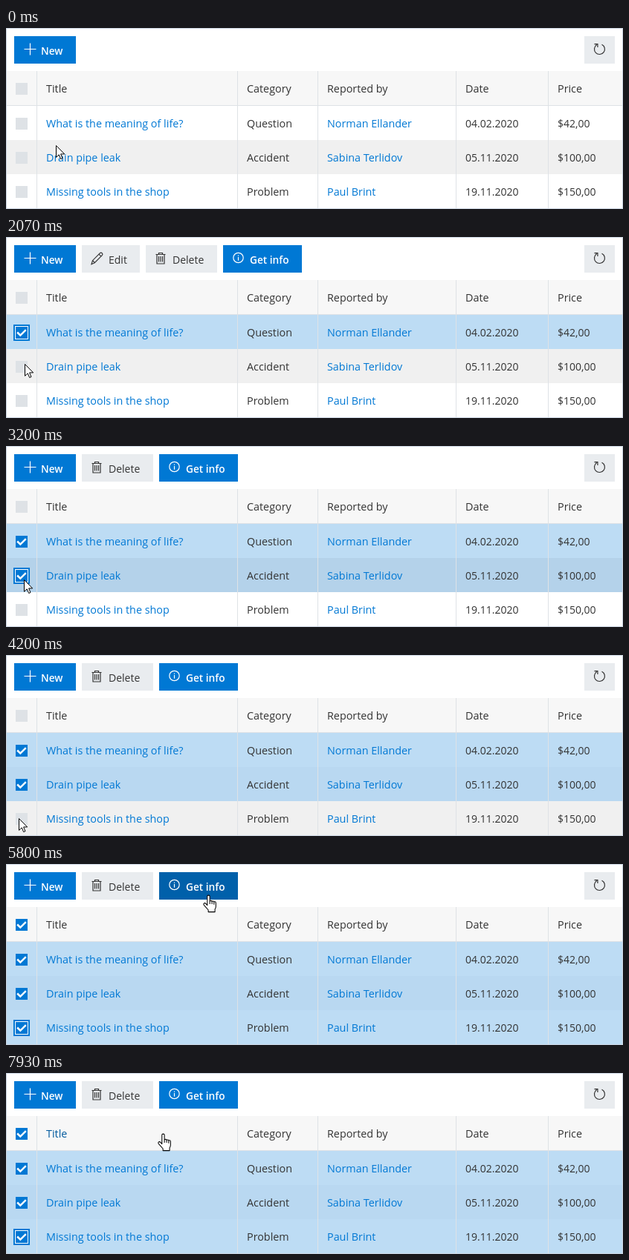
These frames come from a looping animation (830x244 px, 8 s). An HTML page:

```html
<!DOCTYPE html>
<html lang="en">
<head>
<meta charset="utf-8">
<title>Issue list</title>
<style>
  html, body { margin: 0; width: 100%; height: 100%; overflow: hidden; background: #fff; }
  svg { display: block; font: 14.35px "Open Sans", "Noto Sans", sans-serif; }
  text { white-space: pre; }
  .icon { fill: none; stroke-width: 1.2; }
</style>
</head>
<body>
<svg id="stage" width="830" height="244" viewBox="0 0 830 244"></svg>
<script>
const LOOP = 8000, FPS = 15;
const BLUE = '#0078d4', HOVER_BLUE = '#0060aa', DARK_BLUE = '#005a9e';
const GREY = '#e9ecef', LINE = '#dee2e6', INK = '#333';
const stage = document.getElementById('stage');

const columns = [54, 324, 432, 618, 742];
const dividers = [41, 311, 419, 605, 729];
const headings = ['Title', 'Category', 'Reported by', 'Date', 'Price'];
const rows = [
  { cells: ['What is the meaning of life?', 'Question', 'Norman Ellander', '04.02.2020', '$42,00'], selectAt: 15, focus: [15, 35] },
  { cells: ['Drain pipe leak', 'Accident', 'Sabina Terlidov', '05.11.2020', '$100,00'], selectAt: 37, focus: [37, 63] },
  { cells: ['Missing tools in the shop', 'Problem', 'Paul Brint', '19.11.2020', '$150,00'], selectAt: 65, focus: [65, 120] }
];

// Icons are centred near the origin.
const icons = {
  plus: 'M-7 0H9M1-8V8',
  pencil: 'M-7.5 8.2L-6 3.2L4-6.8Q5.4-8 6.8-6.6Q8.1-5.2 6.8-3.8L-3.2 6.2ZM-6 3.2L-3.2 6.2M2.5-5.3L5.4-2.4',
  trash: 'M-7-5H6M-3-5V-7H2V-5M-5.5-5V7.5H4.5V-5M-3-2.5V5M-.5-2.5V5M2-2.5V5',
  info: 'M-6.7-.5A6.7 6.7 0 1 1 6.7-.5A6.7 6.7 0 1 1-6.7-.5M0-1.5V3.3M0-4.1V-2.7',
  refresh: 'M3-6.3A7 7 0 1 1-3.8-5.9M-7-6.9H-2.6V-2.5'
};
const ARROW = 'M.5.5V16.3L4.2 12.8L6.7 18.5L9 17.5L6.6 11.9H11.7Z';
const HAND = 'M5.5 13.5V2.2a1.6 1.6 0 0 1 3.2 0V8.5q0-1 1.4-1 1.4 0 1.4 1.3 0-.7 1.3-.7 1.3 0 1.3 1.4 ' +
  '0-.8 1.1-.7 1.3.1 1.3 1.6V15q0 2-1.2 3.6V22H6.8V19.5L1.2 13.2Q.2 11.6 1.4 10.8 2.5 10.2 3.8 11.6Z' +
  'M8.7 8.5V12M11.5 9V12M14.1 9.5V12.5';

const smooth = p => p * p * (3 - 2 * p);
const easeIn = p => p ** 1.5;
const easeOut = p => 1 - (1 - p) ** 1.5;

// Pointer stops: tick, x, y, easing on the way there.
const stops = [
  [0, 67, 158], [12, 25, 128], [23, 25, 128], [31, 25, 171], [45, 25, 171],
  [56, 17, 220], [68, 17, 220], [73, 107, 204, easeIn], [81, 262, 52, easeOut],
  [87, 271, 43, easeOut], [110, 271, 43], [111, 267, 46], [113, 267, 46], [119, 210, 83]
];

function pointerAt(tick) {
  const i = Math.max(1, stops.findIndex(s => s[0] >= tick));
  const [t0, x0, y0] = stops[i - 1], [t1, x1, y1, ease = smooth] = stops[i];
  const p = ease((tick - t0) / (t1 - t0));
  return { x: Math.round(x0 + (x1 - x0) * p), y: Math.round(y0 + (y1 - y0) * p) };
}

const rect = (x, y, w, h, fill) => `<rect x="${x}" y="${y}" width="${w}" height="${h}" fill="${fill}"/>`;
const label = (x, y, str, fill, extra = '') => `<text x="${x}" y="${y}" fill="${fill}" ${extra}>${str}</text>`;
const icon = (name, x, y, color) => `<path class="icon" d="${icons[name]}" transform="translate(${x} ${y})" stroke="${color}"/>`;
const mix = (a, b, p) => '#' + [1, 3, 5].map(i => {
  const [u, v] = [a, b].map(c => parseInt(c.slice(i, i + 2), 16));
  return Math.round(u + (v - u) * p).toString(16).padStart(2, '0');
}).join('');

// "primary" runs from 0 (grey button) to 1 (blue button).
function button(x, w, name, str, primary = 0, hovered = false) {
  const ink = mix('#333333', '#ffffff', primary);
  const font = primary > 0.5 ? 'font-weight="600" font-size="13.7"' : 'font-size="14"';
  return rect(x, 11, w, 37, hovered ? HOVER_BLUE : mix(GREY, BLUE, primary)) +
    icon(name, x + 20.5, 28.5, ink) + label(x + 36, 36, str, ink, font);
}

function toolbar(tick, infoHovered) {
  let out = button(11, 83, 'plus', 'New', 1);
  if (tick >= 37) {
    const fade = [0.14, 0.68][tick - 37] ?? 1;
    out += button(102, 96, 'trash', 'Delete') + button(206, 106, 'info', 'Get info', fade, infoHovered);
  } else if (tick >= 15) {
    out += button(102, 78, 'pencil', 'Edit') + button(188, 96, 'trash', 'Delete') +
      button(292, 106, 'info', 'Get info', 1);
  }
  return out + rect(778, 11, 41, 37, GREY) + icon('refresh', 798.5, 28.5, INK);
}

function checkbox(y, checked, focused) {
  if (!checked) return rect(13, y, 16, 16, LINE);
  const ring = focused ? rect(10, y - 3, 22, 22, BLUE) + rect(12, y - 1, 18, 18, '#fff') : '';
  return ring + rect(13, y, 16, 16, BLUE) +
    `<path d="M15.2 ${y + 7.5}L19.3 ${y + 11.6}L26.8 ${y + 4.1}" fill="none" stroke="#fff" stroke-width="2.5"/>`;
}

function tableRow(row, i, tick, hovered) {
  const top = 105 + 46 * i, even = i % 2;
  const selected = tick >= row.selectAt;
  const fill = selected
    ? (hovered ? '#b4d2ea' : even ? '#b9d8f1' : '#bddcf4')
    : (hovered ? '#f0f0f0' : even ? '#f8f8f8' : '#ffffff');
  const focused = tick >= row.focus[0] && tick < row.focus[1];
  return rect(1, top, 828, 46, fill) + checkbox(top + 16, selected, focused) +
    row.cells.map((str, c) => label(columns[c], top + 29, str, c === 0 || c === 2 ? BLUE : INK,
      c > 2 ? 'font-size="14"' : '')).join('');
}

function pointer(x, y, hand) {
  const place = hand ? `translate(${x - 6} ${y - 1.5}) scale(1.05)` : `translate(${x} ${y})`;
  return `<path d="${hand ? HAND : ARROW}" transform="${place}" fill="#fff" stroke="#000" stroke-linejoin="round"/>`;
}

function render(tick) {
  const { x, y } = pointerAt(tick);
  const overInfo = tick >= 37 && y < 48 && x >= 206 && x < 312;
  const overTitle = y >= 58 && y < 105 && x > 41 && x < 311;
  const hoverRow = Math.floor((y - 105) / 46);

  stage.innerHTML = rect(0, 0, 830, 244, '#fff') + toolbar(tick, overInfo) +
    rect(1, 58, 828, 47, '#f7f7f7') + checkbox(74, tick >= 65, false) +
    headings.map((str, c) => label(columns[c], 87, str, c === 0 && overTitle ? DARK_BLUE : INK)).join('') +
    rows.map((row, i) => tableRow(row, i, tick, i === hoverRow)).join('') +
    rect(1, 104, 828, 1, LINE) +
    dividers.map(d => rect(d, 58, 1, 185, LINE)).join('') +
    '<rect x=".5" y=".5" width="829" height="243" fill="none" stroke="#c9d3e0"/>' +
    pointer(x, y, overInfo || overTitle);
}

const start = performance.now();
let shown = -1;
function frame() {
  const time = (performance.now() - start) % LOOP;
  const tick = Math.min(119, Math.floor(time * FPS / 1000 + 0.1));
  if (tick !== shown) render(shown = tick);
  requestAnimationFrame(frame);
}
frame();
</script>
</body>
</html>
```
